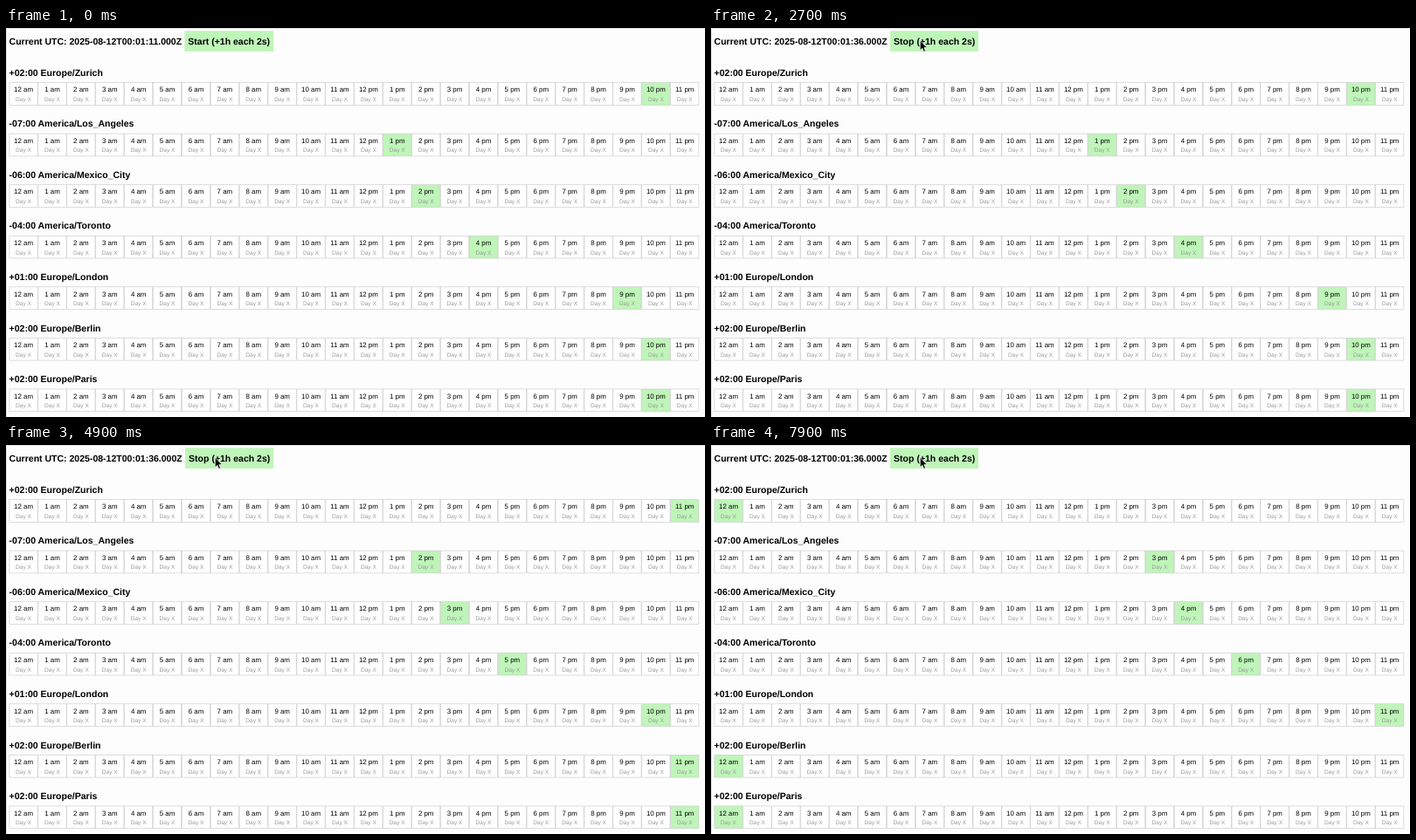
These frames come from a looping animation (800 by 446 pixels, 8 s). An HTML page:

```html
<!DOCTYPE html>
<html lang="en">
<head>
<meta charset="utf-8">
<title>World clock</title>
<style>
  html, body { margin: 0; width: 100%; height: 100%; overflow: hidden; background: #fdfdfd; }
  svg { display: block; font-family: "Liberation Sans", Arial, sans-serif; text-rendering: geometricPrecision; }
  .bold { font-size: 10.53px; font-weight: bold; }
  .hour { font-size: 7.9px; text-anchor: middle; }
  .day { font-size: 6.58px; text-anchor: middle; fill: #999; }
  .cell { fill: #fff; stroke: #ccc; stroke-width: .66; }
  .button, .cell.on { fill: #bff5b9; }
  .edge { fill: none; stroke: #e2e2e2; }
</style>
</head>
<body>
<svg id="stage" width="800" height="446" viewBox="0 0 800 446"></svg>
<script>
const LOOP = 8000, TICK = 2000, CLICK = 2000;
const CELL = 32.9, LEFT = 3.6, PITCH = 58.55;
const BASE_HOUR = 20;
const zones = [
  [2, 'Europe/Zurich'], [-7, 'America/Los_Angeles'], [-6, 'America/Mexico_City'],
  [-4, 'America/Toronto'], [1, 'Europe/London'], [2, 'Europe/Berlin'], [2, 'Europe/Paris'],
];
const stage = document.getElementById('stage');

function add(tag, attrs, text = '') {
  const node = document.createElementNS('http://www.w3.org/2000/svg', tag);
  for (const key in attrs) node.setAttribute(key, attrs[key]);
  node.textContent = text;
  return stage.appendChild(node);
}
const label = (cls, x, y, text) => add('text', { class: cls, x, y }, text);
const clamp = v => Math.min(1, Math.max(0, v));

add('path', { class: 'edge', d: 'M.5 446V.5H800' });
const clock = label('bold', LEFT, 18.8);
const button = add('rect', { class: 'button', y: 3.3, height: 23.6 });
const action = label('bold', 0, 18.8);

const rows = zones.map(([offset, name], row) => {
  const top = 62.3 + row * PITCH;
  const sign = offset < 0 ? '-' : '+';
  label('bold', LEFT, top - 7.5, `${sign}0${Math.abs(offset)}:00 ${name}`);
  const cells = Array.from({ length: 24 }, (_, hour) => {
    const x = LEFT + hour * CELL, mid = x + CELL / 2;
    const cell = add('rect', { class: 'cell', x: x + .33, y: top + .33, width: CELL - .66, height: 25.7 });
    label('hour', mid, top + 11, `${hour % 12 || 12} ${hour < 12 ? 'am' : 'pm'}`);
    label('day', mid, top + 21.6, 'Day X');
    return cell;
  });
  return { offset, cells };
});

const ring = add('circle', { cx: 240, cy: 17, r: 13, fill: 'none', stroke: '#000', 'stroke-width': 1.2 });
const pointer = add('path', {
  d: 'M0 0V11.2L2.6 8.8L4.3 12.8L6.2 12L4.5 8.1H8Z',
  stroke: '#fff', 'stroke-width': .7,
});

function draw(t) {
  const running = t >= CLICK;
  clock.textContent = `Current UTC: 2025-08-12T00:01:${running ? 36 : 11}.000Z`;
  action.textContent = `${running ? 'Stop' : 'Start'} (+1h each 2s)`;
  const x = running ? 205.1 : 204.3;
  button.setAttribute('x', x);
  button.setAttribute('width', 306 - x);
  action.setAttribute('x', x + 4);

  const ticks = Math.max(0, Math.floor((t - CLICK) / TICK));
  for (const { offset, cells } of rows) {
    const now = (BASE_HOUR + offset + ticks) % 24;
    cells.forEach((cell, hour) => cell.classList.toggle('on', hour === now));
  }

  const away = (1 - clamp((t - 100) / 900)) ** 3;
  pointer.setAttribute('transform', `translate(${239.3 + 160 * away} ${14.5 + 150 * away})`);
  pointer.setAttribute('opacity', t < 100 ? 0 : 1);
  ring.setAttribute('opacity', Math.min(clamp((t - 1700) / 100), clamp((2150 - t) / 150)));
}

function frame() {
  draw(performance.now() % LOOP);
  requestAnimationFrame(frame);
}
frame();
</script>
</body>
</html>
```
